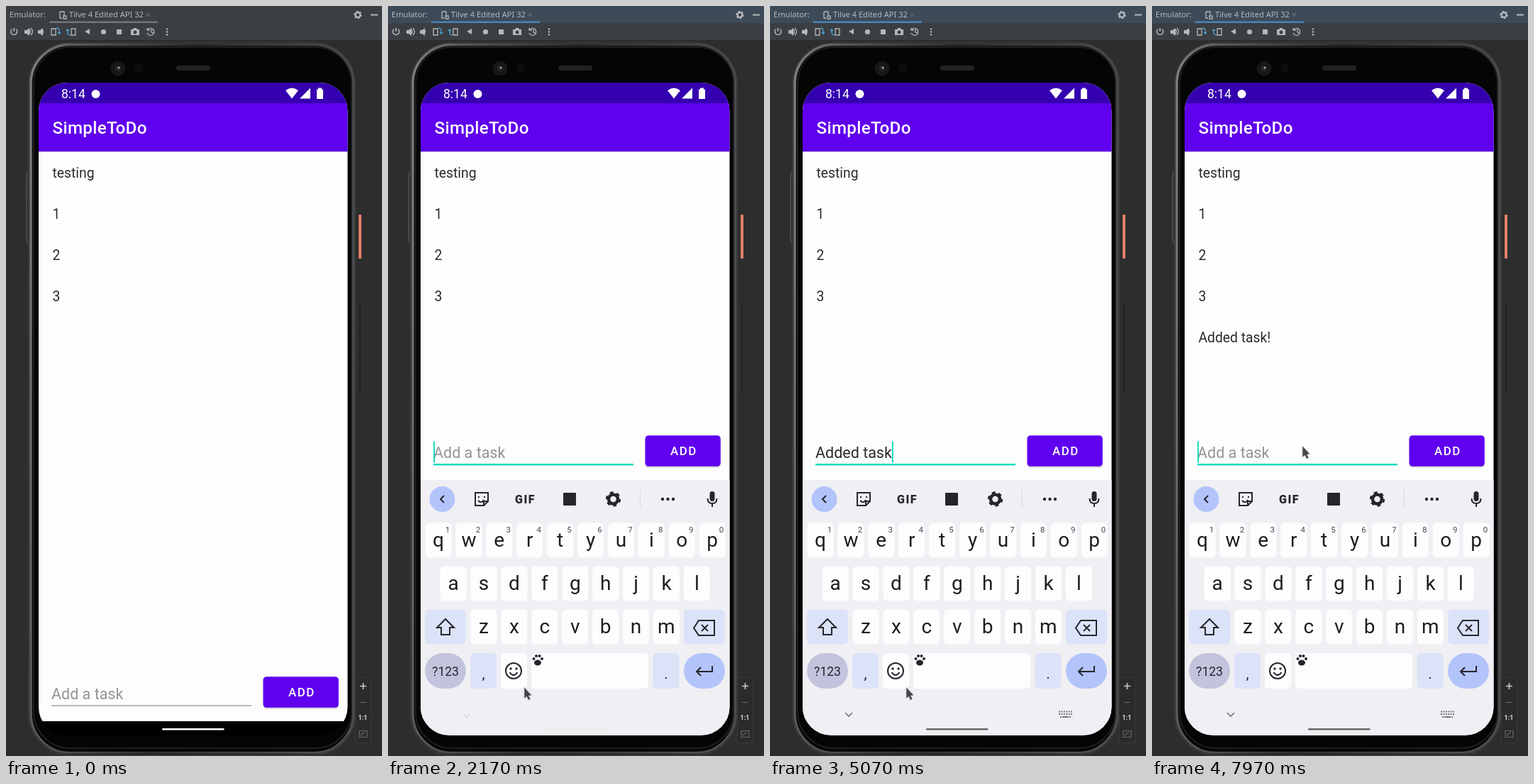
Animation of 530x1057 px, one loop 8000 ms. Source, as an HTML page:

```html
<!DOCTYPE html>
<html lang="en">
<head>
<meta charset="utf-8">
<title>To-do list demo</title>
<style>
html, body { margin: 0; width: 100%; height: 100%; overflow: hidden; background: #2d2d2d; }
svg { display: block; width: 530px; height: 1057px; font-family: Roboto, sans-serif; }
.ide { font-family: "Noto Sans", sans-serif; font-size: 11.1px; fill: #b5b8bb; }
.line { fill: none; stroke-width: 2; }
.key { font-size: 28px; text-anchor: middle; fill: #1d1d22; }
.hint { font-size: 11.5px; text-anchor: middle; fill: #45464f; }
.item { font-size: 19.3px; fill: #2b2b2b; }
.field { font-size: 21.5px; }
</style>
</head>
<body>
<svg viewBox="0 0 530 1057">
  <defs>
    <clipPath id="screen"><rect x="46" y="108" width="435.500" height="920" rx="40"/></clipPath>
    <clipPath id="button"><rect x="362.500" y="945.200" width="106.300" height="43.600" rx="4.800"/></clipPath>
    <linearGradient id="rim" x1="0" y1="0" x2="1" y2=".15">
      <stop offset="0" stop-color="#7c7e81"/><stop offset=".15" stop-color="#55575a"/>
      <stop offset=".5" stop-color="#2c2d2f"/><stop offset="1" stop-color="#4a4b4e"/>
    </linearGradient>
  </defs>

  <!-- emulator window -->
  <rect width="530" height="48" fill="#3b3e42"/>
  <rect id="titleBar" width="530" height="24" fill="#3d4b58"/>
  <rect id="tabLine" x="61" y="21.500" width="153" height="2.500"/>
  <g class="ide">
    <text x="5" y="16">Emulator:</text>
    <text x="89" y="16">Tilve 4 Edited API 32</text>
  </g>
  <g class="line" stroke="#b5b8bb" style="stroke-width:1.3">
    <path d="M76 8h6v5M76 8v9h3M81 14h4v4h-4z"/>
    <path d="M198 10l5 5m0-5l-5 5" stroke="#62666a"/>
    <path d="M514 12.500h10" stroke-width="2"/>
    <path d="M8.500 32.500a4.500 4.500 0 1 0 5.500 0M11.300 31v5" stroke-width="1.500"/>
    <path d="M33 33q3 3 0 6M35 31q5 5 0 10M51 33q3 3 0 6"/>
    <path d="M64 32h6v9h-6zM92 32h6v9h-6z"/>
    <path d="M71 31q4 0 4 4v4m-2-2l2 2 2-2M91 41q-4 0-4-4v-4m-2 2l2-2 2 2" stroke="#4ba3d9"/>
    <path d="M200 33a5 5 0 1 1-1 5M199 31v3h4M205 33v4l3 1"/>
  </g>
  <g fill="#b5b8bb">
    <path d="M26 34h3l4-3v11l-4-3h-3zM45 34h3l4-3v11l-4-3h-3zM118 32v8l-7-4zM156 33h7v7h-7z"/>
    <circle cx="137.500" cy="36.500" r="3.600"/>
    <path fill-rule="evenodd" d="M176 33h3l1-2h4l1 2h3v8h-12zM182 34.500a2.500 2.500 0 1 0 .1 0z"/>
    <circle cx="227" cy="32.500" r="1.300"/><circle cx="227" cy="36.500" r="1.300"/><circle cx="227" cy="40.500" r="1.300"/>
  </g>
  <g id="ideGear"></g>

  <!-- phone body -->
  <path d="M31 234q-2 2-2 8v84q0 6 2 8" class="line" stroke="#48494b"/>
  <rect x="497" y="294" width="4" height="62" rx="1" fill="#e37f6b"/>
  <rect x="498" y="420" width="2" height="125" fill="#202123"/>
  <rect x="32" y="52" width="460" height="1004" rx="58" fill="#141516" stroke="#4d4e51"/>
  <rect x="35" y="54.500" width="454.500" height="998" rx="55" fill="#060607" stroke="url(#rim)" stroke-width="3.500"/>
  <rect x="39" y="58" width="448" height="988" rx="51" fill="#050506" stroke="#1d1e20" stroke-width="2"/>
  <rect x="240" y="84" width="48" height="7" rx="3.500" fill="#222"/>
  <circle cx="158" cy="88" r="10.500" fill="#171717"/><circle cx="158" cy="88" r="4" fill="#292929"/>
  <circle cx="159" cy="87" r="1.300" fill="#bbb"/><circle cx="187" cy="87" r="6.500" fill="#0d0d0e"/>

  <!-- zoom panel -->
  <rect x="492.500" y="946.500" width="22" height="92" fill="#2b2b2c" stroke="#383838"/>
  <path d="M499 958.500h9m-4.500-4.500v9" class="line" stroke="#ccc" style="stroke-width:1.600"/>
  <path d="M499 981.500h9M498 1021.500h11v9h-11zM500 1028l6-5" class="line" stroke="#666" style="stroke-width:1.200"/>
  <text x="503" y="1006" font-size="9" font-weight="700" text-anchor="middle" fill="#ddd">1:1</text>

  <g clip-path="url(#screen)">
    <rect x="46" y="108" width="436" height="900" fill="#fdfdfd"/>
    <rect x="46" y="108" width="436" height="29" fill="#3500b0"/>
    <rect x="46" y="137" width="436" height="68" fill="#5f00ee"/>
    <rect x="46" y="205" width="436" height="1" opacity=".2"/>
    <g fill="#fff">
      <text x="78" y="130" font-size="17.500">8:14</text>
      <circle cx="126.500" cy="124" r="6"/>
      <path d="M394 119q9-7 18 0l-9 11.500zM429 115.500v15h-15zM438 117.500h2v-2h5v2h2v13.500h-9z"/>
      <text x="65.500" y="180" font-size="24.200" font-weight="500" letter-spacing=".3">SimpleToDo</text>
    </g>
    <g class="item">
      <text x="65.500" y="241.500">testing</text>
      <text x="65.500" y="299.500">1</text>
      <text x="65.500" y="357.500">2</text>
      <text x="65.500" y="415.500">3</text>
      <text id="added" x="65.500" y="473.500">Added task!</text>
    </g>
    <rect x="46" y="1008" width="436" height="20" fill="#000"/>
    <g id="form">
      <text id="entry" class="field" x="64" y="977"></text>
      <rect id="underline" x="64"/>
      <rect id="caret" y="953.500" width="2" height="30" fill="#16dcc0"/>
      <rect x="362.500" y="947.200" width="106.300" height="43.600" rx="4.800" fill="#000" opacity=".16"/>
      <rect x="362.500" y="945.200" width="106.300" height="43.600" rx="4.800" fill="#5f00ee"/>
      <circle id="ripple" cx="430" cy="966" fill="#fff" clip-path="url(#button)"/>
      <text x="398" y="973" font-size="16.900" font-weight="500" letter-spacing="1.500" fill="#fff">ADD</text>
    </g>
    <g id="keyboard">
      <rect x="46" y="668" width="436" height="362" fill="#f0eff3"/>
      <circle cx="76.500" cy="695" r="18" fill="#b3c4fb"/>
      <g id="keys"></g>
      <g class="line" stroke="#25262c">
        <path d="M79 690l-5 5 5 5"/>
        <path d="M123 686h18v12l-6 6h-12zM141 698h-6v6M127 697q5 5 8-1M128 691v2M136 691v2"/>
        <path d="M450.500 694q0 7 6.500 7t6.500-7M457 701v5"/>
        <path d="M81 864l12 12h-6v10h-12v-10h-6z"/>
        <path d="M438 866h22v21h-22l-7-10.500zM442 872l9 9m0-9l-9 9"/>
        <circle cx="177" cy="937" r="11"/><path d="M171.500 939q5.500 8 11 0"/>
        <path d="M457 930v8h-22m6-6l-6 6 6 6"/>
      </g>
      <g fill="#25262c">
        <text x="179" y="700.500" font-size="16" font-weight="900" letter-spacing="1.500">GIF</text>
        <rect x="247" y="686" width="18" height="18" rx="1"/>
        <rect x="453.500" y="684" width="7" height="14" rx="3.500"/>
        <circle cx="387" cy="695" r="2.200"/><circle cx="394.500" cy="695" r="2.200"/><circle cx="402" cy="695" r="2.200"/>
        <circle cx="173" cy="934" r="1.700"/><circle cx="181" cy="934" r="1.700"/>
        <ellipse cx="211" cy="925.500" rx="5" ry="4"/>
        <circle cx="205.500" cy="920" r="2"/><circle cx="209" cy="916" r="2"/><circle cx="213.500" cy="916" r="2"/><circle cx="217" cy="920" r="2"/>
        <text x="81" y="944" font-size="17.500" text-anchor="middle">?123</text>
        <text x="134.500" y="948" font-size="21" text-anchor="middle">,</text>
        <text x="392" y="948" font-size="21" text-anchor="middle">.</text>
      </g>
      <path d="M355.500 682v26" stroke="#d5d6de"/>
      <g id="kbGear"></g>
      <g class="line" stroke="#73747c">
        <path id="chevron" d="M106 996l5 5 5-5" style="stroke-width:1.600"/>
        <g id="switcher">
          <path d="M407 994.500h19M407 998h19" stroke-dasharray="2 1.400"/>
          <path d="M409 1002h15" stroke-dasharray="2 1 9 1"/>
        </g>
      </g>
    </g>
    <rect id="handle" x="220" y="1018" width="87.500" height="2.500" rx="1.200"/>
  </g>
  <path id="pointer" d="M0 0v16l3.500-2.800 2.300 5 3-1.400-2.300-4.800 4.200-.5z" fill="#45454a" stroke="#c8c8cc" stroke-width=".7"/>
</svg>
<script>
const LOOP = 8000;
const FOCUS = 1880, SUBMIT = 6800;
const PITCH = 42.9;
const el = id => document.getElementById(id);
const set = (id, attrs) => {
  for (const name in attrs) el(id).setAttribute(name, attrs[name]);
};
const clamp = v => Math.max(0, Math.min(1, v));
const progress = (t, from, to) => clamp((t - from) / (to - from));
const smooth = p => p * p * (3 - 2 * p);

function key(center, y, width, fill, radius = 6, height = 49) {
  return `<rect x="${center - width / 2}" y="${y}" width="${width}" height="${height}" rx="${radius}" fill="${fill}"/>`;
}

function letters(row, x, y) {
  return [...row].map((letter, i) => {
    const center = x + i * PITCH;
    const digit = y < 780 ? `<text class="hint" x="${center + 13}" y="${y + 13.5}">${(i + 1) % 10}</text>` : '';
    return key(center, y, 37, '#fdfdfe') +
      `<text class="key" x="${center}" y="${y + 33}">${letter}</text>` + digit;
  }).join('');
}

function gear(x, y, r, color) {
  return `<g fill="none" stroke="${color}" transform="translate(${x} ${y})">
    <circle r="${r * .62}" stroke-width="${r * .42}"/>
    <circle r="${r * .88}" stroke-width="${r * .28}" pathLength="12" stroke-dasharray="1 1"/></g>`;
}

const MOD = '#dce2f8';
el('keys').innerHTML =
  letters('qwertyuiop', 71, 728.5) + letters('asdfghjkl', 92.2, 789.5) + letters('zxcvbnm', 135, 850.5) +
  key(81, 850.5, 58, MOD) + key(446, 850.5, 58, MOD) +
  key(81, 912, 58, '#c1c4dc', 25, 50) + key(446, 912, 58, '#b3c4fb', 25, 50) +
  key(134.5, 912, 37, MOD, 6, 50) + key(392, 912, 37, MOD, 6, 50) +
  key(177.5, 912, 37, '#fdfdfe', 6, 50) + key(284.5, 912, 165, '#fdfdfe', 6, 50);
el('ideGear').innerHTML = gear(496, 12.5, 5.6, '#b5b8bb');
el('kbGear').innerHTML = gear(317.5, 695, 10.5, '#25262c');

const MESSAGE = 'Added task!';
const strokes = [2900, 3150, 3400, 3880, 4040, 4230, 4400, 4560, 4720, 4880, 5500];

// time, x, y of the pointer tip
const route = [
  [850, 540, 330], [1270, 261, 741], [1680, 192, 960],
  [5850, 192, 960], [6450, 428, 624], [6950, 428, 624], [7600, 212, 620]
];

function pointerAt(t) {
  const next = route.findIndex(stop => stop[0] > t);
  if (next === 0) return [-50, -50];
  if (next < 0) return route[route.length - 1].slice(1);
  const [t0, x0, y0] = route[next - 1], [t1, x1, y1] = route[next];
  const p = smooth(progress(t, t0, t1));
  return [x0 + (x1 - x0) * p, y0 + (y1 - y0) * p];
}

function draw(t) {
  const focused = t >= FOCUS, submitted = t >= SUBMIT;
  const windowActive = t >= 1720;
  set('titleBar', { opacity: +windowActive });
  set('tabLine', { fill: windowActive ? '#4b83b8' : '#71767b' });

  const typed = submitted ? 0 : strokes.filter(s => s <= t).length;
  const entry = el('entry');
  const text = MESSAGE.slice(0, typed);
  entry.textContent = text || 'Add a task';
  entry.setAttribute('fill', text ? '#2b2b2b' : '#949494');
  const end = text ? 64 + entry.getComputedTextLength() : 64;
  const lastInput = submitted ? SUBMIT : typed ? strokes[typed - 1] : FOCUS;
  const caretOn = focused && (t - lastInput) % 1000 < 500;
  set('caret', { x: end, opacity: +caretOn });
  set('underline', focused
    ? { y: 985, width: 282, height: 2.5, fill: '#16dcc0' }
    : { y: 985.5, width: 282, height: 1, fill: '#777' });
  set('form', { transform: `translate(0 ${focused ? -340 : 0})` });
  set('added', { opacity: +submitted });

  const ripple = progress(t, 6720, 7100);
  set('ripple', { r: 75 * Math.sqrt(ripple), opacity: .24 * (1 - ripple) });

  const hidden = (1 - progress(t, FOCUS, 2165)) ** 2;
  set('keyboard', { transform: `translate(0 ${362 * hidden})` });
  const reveal = progress(t, 2140, 2340);
  set('chevron', { opacity: reveal, transform: `translate(0 ${2 * (1 - reveal)})` });
  set('switcher', { opacity: progress(t, 2180, 2380) });
  const shade = Math.round(255 - 150 * progress(t, 2140, 2420));
  set('handle', { fill: `rgb(${shade},${shade},${shade})` });

  set('pointer', { transform: `translate(${pointerAt(t)})` });
}

function tick(now) {
  draw(now % LOOP);
  requestAnimationFrame(tick);
}
draw(0);
requestAnimationFrame(tick);
</script>
</body>
</html>
```
